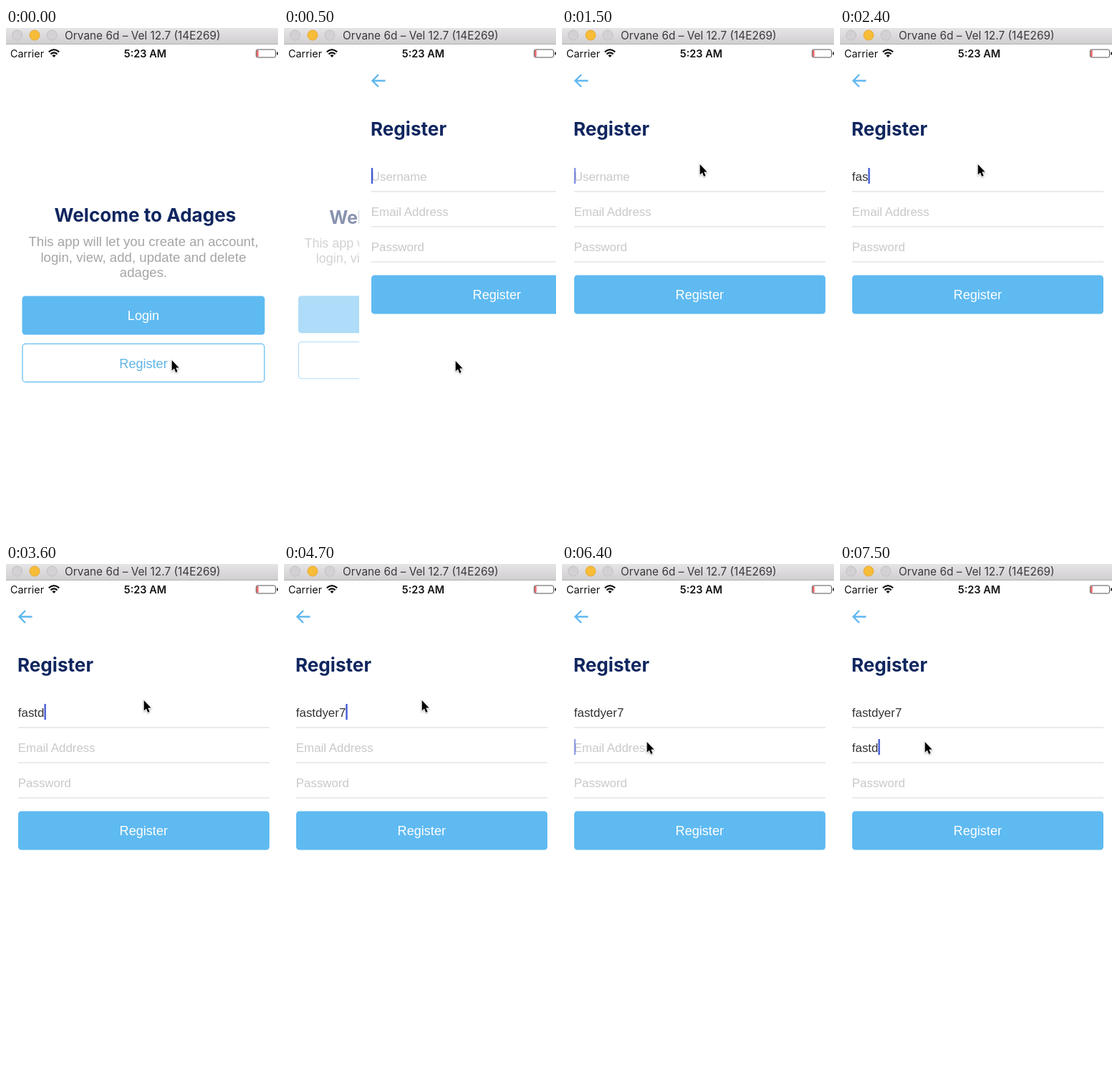
Recreate the animation shown at these times as an HTML page. Size 380 by 708 pixels, loop 8000 ms.

```html
<!DOCTYPE html>
<html lang="en">
<head>
<meta charset="utf-8">
<style>
  html, body { margin: 0; width: 100%; height: 100%; overflow: hidden; background: #fff; }
  svg { display: block; width: 380px; height: 708px; }
  text { font-family: "Liberation Sans", Arial, sans-serif; }
  .ui { font-family: Inter, sans-serif; }
  .heading { font: 700 26.1px Inter, sans-serif; fill: #10265f; }
  .intro { font-size: 18.65px; fill: #a5a5a5; }
  .label { font-size: 18.1px; }
  .field { font-size: 16.9px; fill: #333; }
  .hint { fill: #c9c9cc; }
  .mid { text-anchor: middle; }
</style>
</head>
<body>
<svg viewBox="0 0 380 708" xmlns="http://www.w3.org/2000/svg">
  <defs>
    <linearGradient id="bar" x2="0" y2="1">
      <stop stop-color="#e6e4e6"/><stop offset="1" stop-color="#d0ced0"/>
    </linearGradient>
  </defs>
  <rect width="380" height="708" fill="#fff"/>

  <g id="welcome">
    <text class="heading" x="67.5" y="270">Welcome to Adages</text>
    <g class="intro mid">
      <text x="192" y="304">This app will let you create an account,</text>
      <text x="192" y="325.5">login, view, add, update and delete</text>
      <text x="192" y="347">adages.</text>
    </g>
    <rect x="22.5" y="373.5" width="339" height="54" rx="4.5" fill="#5fbaf1"/>
    <text class="label mid" x="192" y="407" fill="#fff">Login</text>
    <g id="registerButton">
      <rect x="23" y="440.2" width="338" height="53.2" rx="4.5" fill="#fff" stroke="#5fbaf1" stroke-width="1.2"/>
      <text class="label mid" x="192" y="474" fill="#5fb5e8">Register</text>
    </g>
  </g>

  <g id="register">
    <rect y="23" width="380" height="685" fill="#fff"/>
    <path d="M36.5 73.5H18.5M27 65L18.5 73.5L27 82" fill="none" stroke="#5fb8ee" stroke-width="2.4"/>
    <text class="heading" x="16" y="150">Register</text>
    <g id="fields"></g>
    <rect x="17" y="344.5" width="351" height="54" rx="4.5" fill="#5fbaf1"/>
    <text class="label mid" x="192.3" y="378" fill="#fff">Register</text>
    <rect id="caret" width="2.4" height="22" fill="#465bd6"/>
  </g>

  <rect y="23" width="380" height="24" fill="#fff"/>
  <g fill="#111">
    <text class="ui" x="6" y="40.5" font-size="14.4">Carrier</text>
    <text class="ui mid" x="194.5" y="40.5" font-size="14.5" font-weight="600">5:23 AM</text>
  </g>
  <g fill="none" stroke="#111" stroke-width="2.2">
    <path d="M59.8 33.4Q67 27 74.2 33.4M62.4 36.4Q67 32.2 71.6 36.4"/>
    <path d="M67 41L64.4 38.3Q67 36.2 69.6 38.3Z" fill="#111" stroke="none"/>
  </g>
  <rect x="349.5" y="30" width="27" height="11" rx="2" fill="#fff" stroke="#555" stroke-width="1"/>
  <rect x="350.5" y="31" width="2" height="9" fill="#ee4444"/>
  <rect x="378" y="33.5" width="2" height="4" fill="#444"/>

  <rect width="380" height="22.5" fill="url(#bar)"/>
  <rect y="22" width="380" height="1" fill="#b3b1b3"/>
  <g fill="#d3d1d3" stroke="#c2c0c2">
    <circle cx="15.5" cy="10" r="7"/>
    <circle cx="40" cy="10" r="7" fill="#f7bc38" stroke="#e6ab34"/>
    <circle cx="64" cy="10" r="7"/>
  </g>
  <text class="ui" x="82" y="15.5" font-size="15.4" fill="#3b3a3b">Orvane 6d – Vel 12.7 (14E269)</text>

  <g id="pointer">
    <path d="M0 0V16.4L3.7 13L6.3 19.2L9 18L6.4 12H11.3Z" transform="translate(.7 1) scale(.88)"
      fill="#000" stroke="#fff" stroke-width="2" paint-order="stroke"
      style="filter: drop-shadow(0 1px 1px rgba(0,0,0,.3))"/>
  </g>
</svg>
<script>
const LOOP = 8000, STEP = 100, LEFT = 16.8, SLIDE_START = 400;
const $ = id => document.getElementById(id);
const clamp = v => Math.min(1, Math.max(0, v));
const smooth = v => v * v * (3 - 2 * v);

function addNode(tag, attrs, parent) {
  const node = document.createElementNS('http://www.w3.org/2000/svg', tag);
  for (const key in attrs) node.setAttribute(key, attrs[key]);
  return parent.appendChild(node);
}

// keys: the time at which each character of value is typed
const fields = [
  { hint: 'Username', value: 'fastdyer7', y: 213, focus: 400,
    keys: [1900, 2200, 2400, 2600, 3600, 3800, 4000, 4300, 4700] },
  { hint: 'Email Address', value: 'fastd', y: 262, focus: 5800,
    keys: [6600, 6800, 7000, 7200, 7500] },
  { hint: 'Password', value: '', y: 311, focus: Infinity, keys: [] }
];
for (const f of fields) {
  f.text = addNode('text', { x: LEFT, y: f.y }, $('fields'));
  addNode('rect', { x: 17, y: f.y + 14.2, width: 351, height: 1.4, fill: '#e2e2e4' }, $('fields'));
}

const pointerPath = [
  [0, 231, 462], [200, 239, 463], [500, 239, 463], [800, 189, 241],
  [1200, 192, 189], [5100, 192, 189], [5500, 118, 247], [LOOP, 118, 247]
];

function pointerAt(t) {
  const i = pointerPath.findIndex(p => p[0] > t);
  const [t0, x0, y0] = pointerPath[i - 1], [t1, x1, y1] = pointerPath[i];
  const k = smooth((t - t0) / (t1 - t0));
  return [x0 + (x1 - x0) * k, y0 + (y1 - y0) * k];
}

// Caret opacity by the time since focus or the last key
const blink = age => age < 600 ? 1 : clamp(Math.max((800 - age) / 360, (age - 900) / 300));

const slideOffset = t => t < SLIDE_START ? 380
  : Math.round(380 * Math.exp(-Math.pow((t - 300) / 172, 1.66)));

function drawScreens(t) {
  const offset = slideOffset(t), p = 1 - offset / 380;
  $('register').setAttribute('transform', `translate(${offset} 0)`);
  $('welcome').setAttribute('transform',
    `translate(${190 - 12 * p} 365) scale(${1 - 0.05 * p}) translate(-190 -365)`);
  $('welcome').setAttribute('opacity', 1 - 0.7 * p);
  const pressed = t < 100 || t >= SLIDE_START ? 1 : t < 200 ? 0.6 : 0.2;
  $('registerButton').setAttribute('opacity', pressed);
}

function drawFields(t) {
  for (const f of fields) {
    f.count = f.keys.filter(k => k <= t).length;
    f.text.textContent = f.count ? f.value.slice(0, f.count) : f.hint;
    f.text.setAttribute('class', f.count ? 'field' : 'field hint');
  }
  const active = t >= fields[1].focus ? fields[1] : fields[0];
  const width = active.count ? active.text.getComputedTextLength() : 0;
  const last = active.count ? active.keys[active.count - 1] : active.focus;
  $('caret').setAttribute('x', LEFT + width);
  $('caret').setAttribute('y', active.y - 18);
  $('caret').setAttribute('opacity', blink(t - last));
}

function draw(now) {
  const t = Math.floor((now % LOOP) / STEP) * STEP;
  drawScreens(t);
  drawFields(t);
  $('pointer').setAttribute('transform', `translate(${pointerAt(t)})`);
}

const start = performance.now();
function tick() {
  draw(performance.now() - start);
  requestAnimationFrame(tick);
}
tick();
</script>
</body>
</html>
```
